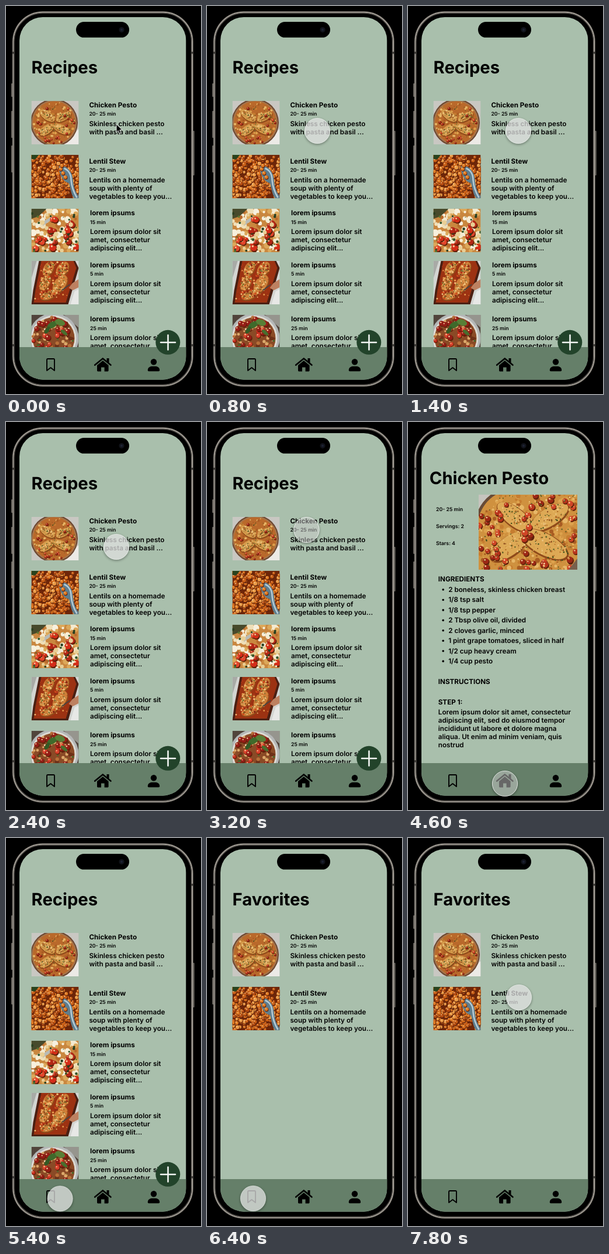
An HTML page that plays this animation: 334 by 662 pixels, repeating every 8000 ms.

```html
<!DOCTYPE html>
<html lang="en">
<head>
<meta charset="utf-8">
<title>Recipe app</title>
<style>
  html, body { margin: 0; width: 100%; height: 100%; overflow: hidden; background: #000; }
  svg { display: block; }
  text {
    font-family: Inter, Arial, sans-serif; white-space: pre;
    font-optical-sizing: none; text-rendering: geometricPrecision;
  }
</style>
</head>
<body>
<svg id="stage" width="100%" height="100%" viewBox="0 0 334 662"></svg>
<script>
const LOOP = 8000, STEP = 200;
const stage = document.getElementById('stage');

// Markup helpers
const text = (x, y, s, size = 11.68, weight = 600) =>
  `<text x="${x}" y="${y}" font-size="${size}" font-weight="${weight}">${s}</text>`;
const lines = (x, y, list, gap) => list.map((s, i) => text(x, y + i * gap, s)).join('');
const rect = (x, y, w, h, fill, r = 0, more = '') =>
  `<rect x="${x}" y="${y}" width="${w}" height="${h}" rx="${r}" fill="${fill}" ${more}/>`;
const circle = (x, y, r, fill, more = '') =>
  `<circle cx="${x}" cy="${y}" r="${r}" fill="${fill}" ${more}/>`;
const oval = (x, y, rx, ry, turn, fill) =>
  `<ellipse rx="${rx}" ry="${ry}" fill="${fill}" transform="translate(${x} ${y}) rotate(${turn})"/>`;
const path = (d, fill, more = '') => `<path d="${d}" fill="${fill}" ${more}/>`;

function random(seed) {
  return () => (seed = (seed * 16807) % 2147483647) / 2147483647;
}

const dot = (x, y, r, fill) => circle(x.toFixed(1), y.toFixed(1), r.toFixed(1), fill);
// A round bit with a dark underside and a highlight
const bead = (x, y, r, fill) => dot(x + r * .2, y + r * .3, r * 1.1, '#5e200a') +
  dot(x, y, r, fill) + dot(x - r * .3, y - r * .35, r * .28, '#f6cf9c');

// Scatter round bits over a w by h area
function scatter(seed, n, w, h, r0, r1, colors, inside = () => true, shape = dot) {
  const rnd = random(seed * 7919);
  let out = '';
  for (let i = 0; i < n; i++) {
    const x = rnd() * w, y = rnd() * h, r = r0 + rnd() * (r1 - r0);
    const fill = colors[Math.floor(rnd() * colors.length)];
    if (inside(x, y)) out += shape(x, y, r, fill);
  }
  return out;
}

// Food pictures, thumbnails are 81 by 74
const GOLD = ['#dda24d', '#e7b768', '#c67d30', '#a95c22'];
const RED = ['#b8331c', '#cf4526', '#9c2715'];
const GREEN = ['#3f4f1c', '#5f6428'];

const fillet = (x, y, rx, ry, turn, seed, tone = '#d59c4c') => {
  const spice = ['#edc683', '#b06a27', '#e2b061', '#8a4a1c', '#5f6428'];
  const bits = scatter(seed, 60, rx * 1.5, ry * 1.3, .5, 1.5, spice);
  return oval(x + .6, y + 1.4, rx, ry, turn, '#8f4a1a') + oval(x, y, rx * .95, ry * .9, turn, tone) +
    `<g transform="translate(${x} ${y}) rotate(${turn}) translate(${-rx * .75} ${-ry * .65})">${bits}</g>`;
};

function pesto() {
  const pan = (x, y) => Math.hypot(x - 39, y - 37) < 35;
  return rect(0, 0, 81, 74, '#c9c7c2') + path('M50 74L81 48V74Z', '#eceae6') +
    circle(39, 37, 40.5, '#6b4630') + circle(39, 37, 38.5, '#a5754c') + circle(39, 37, 36.5, '#b9692b') +
    scatter(3, 160, 81, 74, .8, 2.4, GOLD, pan) +
    fillet(27, 25, 16, 8, 35, 4) + fillet(55, 27, 15, 7, -28, 5) +
    fillet(26, 49, 15, 8, -35, 6) + fillet(52, 48, 17, 8, 25, 8) +
    scatter(9, 60, 81, 74, 1.5, 2.5, RED, (x, y) => pan(x, y) && Math.hypot(x - 39, y - 37) > 21, bead) +
    scatter(10, 60, 81, 74, .5, 1, GREEN, pan);
}

function stew() {
  const peas = ['#e07a22', '#c95f17', '#ea9a45', '#d36b1c', '#b34c12'];
  return rect(0, 0, 81, 74, '#6e2609') +
    scatter(21, 300, 81, 74, 2.2, 3.6, peas, undefined, bead) +
    path('M0 0H13L6 8L0 7Z', '#28431d') +
    path('M47 20C57 15 70 27 71 41C72 55 76 65 81 70V74H73C67 66 67 54 64 48C54 46 47 32 47 20Z', '#5f7d8c') +
    path('M56 23C64 26 68 34 68 43C69 55 73 65 78 73', 'none', 'stroke="#b5cbd6" stroke-width="2.6"') +
    [[50, 24], [54, 31], [58, 38], [52, 18]].map(([x, y]) => bead(x, y, 3, peas[0])).join('');
}

function bake() {
  const low = (x, y) => x + y * 1.3 > 55;
  return rect(0, 0, 81, 74, '#c9873f') +
    scatter(31, 90, 81, 74, 2, 6, ['#efdfb8', '#dca85a', '#f4ead0', '#b96a2c', '#f7f0de']) +
    path('M0 0H26L12 13L0 17Z', '#474a2b') + path('M17 24L35 13L37 17L20 29Z', '#b8bbb6') +
    scatter(34, 34, 81, 74, 3, 6, ['#d42d18', '#e2452a', '#b42716'], low, bead) +
    scatter(36, 24, 81, 74, 1.5, 4, ['#f7eed6', '#e9cf95']) +
    scatter(37, 30, 81, 74, .8, 2.4, ['#35562a', '#5c752f', '#293f20']);
}

function tray() {
  const tone = '#cf7f38';
  return rect(0, 0, 81, 74, '#d3d5d2') + path('M0 0H9L0 30Z', '#a8aaa6') +
    path('M13 0H75L81 12L63 74H0L3 50Z', '#4a1f12') + path('M17 0H72L77 12L59 71H4L7 50Z', '#9c3212') +
    fillet(29, 13, 14, 9, -60, 41, tone) + fillet(53, 14, 15, 10, -55, 42, tone) +
    fillet(23, 37, 15, 9, -60, 43, tone) + fillet(49, 39, 18, 11, -55, 44, tone) + fillet(29, 58, 15, 8, -20, 45, tone) +
    scatter(46, 150, 62, 66, .7, 2, ['#cf4a1c', '#8d2c15', '#efbd77', '#b5361a', '#e59a4c'], (x, y) => x > 17 - y / 6 && x < 76 - y / 4) +
    path('M81 31L70 38L64 46L71 50L81 45Z', '#bd8060') + path('M66 40L52 50', 'none', 'stroke="#444" stroke-width="1.6"') +
    path('M67 74L74 52L81 48V74Z', '#e7e8e6');
}

function salad() {
  const dish = (x, y) => Math.hypot(x - 38, y - 39) < 36;
  return rect(0, 0, 81, 74, '#51443b') + path('M56 0H81V22Z', '#96958e') +
    circle(38, 40, 43, '#b4b7b7') + circle(38, 40, 39, '#dddbd3') + circle(38, 40, 36, '#8a4a26') +
    scatter(51, 90, 81, 74, 1.5, 3.5, ['#dba86a', '#b77039', '#6d3018'], dish) +
    scatter(53, 26, 81, 74, .8, 2, ['#4a6b2c', '#f0d4b0'], dish) +
    scatter(52, 60, 81, 74, 3, 4.6, ['#c22a1c', '#941d16', '#d8402b'], dish, bead) +
    oval(36, 17, 10, 5, -28, '#3f6a2b') + oval(49, 13, 9, 5, 20, '#587f36') +
    oval(27, 26, 7, 3.5, -55, '#345924') + oval(56, 30, 7, 3, 40, '#486f2e');
}

function closeUp() {
  const food = (x, y) => x + y > 38;
  const edge = (x, y) => food(x, y) && (y < 22 || x < 38 || Math.abs(x - 86) < 9 || y > 108 || x > 158);
  return rect(0, 0, 169, 128, '#cf913f') + path('M0 0H26C12 8 5 18 0 30Z', '#c6c4be') +
    path('M28 -2C12 8 4 20 -2 36', 'none', 'stroke="#674b37" stroke-width="5"') +
    scatter(61, 320, 169, 128, 1.5, 4.5, GOLD, food) +
    fillet(62, 38, 38, 17, 38, 62, '#dda955') + fillet(121, 38, 39, 17, -32, 63, '#dda955') +
    fillet(52, 88, 39, 18, -35, 64, '#dda955') + fillet(112, 84, 46, 20, 28, 65, '#dda955') +
    scatter(66, 95, 169, 128, 3.5, 5.6, RED, edge, bead) +
    scatter(69, 170, 169, 128, .6, 1.8, ['#efc781', '#b56d29', '#e8b863'], food) +
    scatter(68, 130, 169, 128, .6, 1.4, GREEN, food) +
    path('M154 128L169 109V128Z', '#77604c');
}

const photo = (x, y, w, h, art) => `<svg x="${x}" y="${y}" width="${w}" height="${h}" overflow="hidden">${art}</svg>`;

// Pages
const filler = ['Lorem ipsum dolor sit', 'amet, consectetur', 'adipiscing elit...'];
const recipes = [
  [162, 142.4, 172.8, 'Chicken Pesto', '20- 25 min', ['Skinless chicken pesto', 'with pasta and basil ...'], pesto],
  [254, 142.4, 268.8, 'Lentil Stew', '20- 25 min', ['Lentils on a homemade', 'soup with plenty of', 'vegetables to keep you...'], stew],
  [346, 144, 357.2, 'lorem ipsums', '15 min', filler, bake],
  [435, 144, 445.8, 'lorem ipsums', '5 min', filler, tray],
  [527, 144, 538, 'lorem ipsums', '25 min', filler, salad]
];
const row = ([top, x, y, name, time, about, art]) =>
  photo(43.5, top, 81, 74, art()) + text(x, y, name, 11.68, 700) +
  text(x, y + 14.6, time, 8.75) + lines(x, y + 32, about, 14);

const listPage = (title, items) => text(43.6, 115.4, title, 29.2, 700) + items.map(row).join('');

const ingredients = ['2 boneless, skinless chicken breast', '1/8 tsp salt', '1/8 tsp pepper',
  '2 Tbsp olive oil, divided', '2 cloves garlic, minced', '1 pint grape tomatoes, sliced in half',
  '1/2 cup heavy cream', '1/4 cup pesto'];
const steps = ['Lorem ipsum dolor sit amet, consectetur', 'adipiscing elit, sed do eiusmod tempor',
  'incididunt ut labore et dolore magna', 'aliqua. Ut enim ad minim veniam, quis', 'nostrud'];

const detailPage = () =>
  text(36.8, 106, 'Chicken Pesto', 29.2, 700) +
  ['20- 25 min', 'Servings: 2', 'Stars: 4'].map((s, i) => text(48, 151.6 + i * 29, s, 8.75)).join('') +
  photo(121, 124, 169, 128, closeUp()) +
  text(51.8, 272.2, 'INGREDIENTS', 11.68, 700) + lines(69.2, 289.8, ingredients, 17.45) +
  ingredients.map((s, i) => circle(60.2, 286 + i * 17.45, 1.8, '#000')).join('') +
  text(51.8, 446.6, 'INSTRUCTIONS', 11.68, 700) + text(51.8, 481.6, 'STEP 1:', 11.68, 700) +
  lines(51.8, 499, steps, 14);

const navBar = () =>
  rect(23, 582, 285.5, 56, '#657f69') +
  path('M71.5 602H81.5Q83 602 83 603.5V622L76.5 617L70 622V603.5Q70 602 71.5 602Z', 'none',
    'stroke="#000" stroke-width="1.9" stroke-linejoin="round"') +
  path('M152.2 612.6L165.8 601.4L179.4 612.6', 'none',
    'stroke="#000" stroke-width="2.6" stroke-linecap="round" stroke-linejoin="round"') +
  path('M172.5 601H176.5V609L172.5 606Z', '#000') +
  path('M156 613L165.8 605L175.6 613V622Q175.6 623.4 174.2 623.4H168.6V616.5H163V623.4H157.4Q156 623.4 156 622Z', '#000') +
  circle(253, 607.3, 5.2, '#000') +
  path('M242.8 621.5C242.8 617 246.5 614.8 250 614.8H256C259.6 614.8 263.2 617 263.2 621.5Q263.2 623.2 261.5 623.2H244.5Q242.8 623.2 242.8 621.5Z', '#000');

const addButton = () => circle(277.3, 573.8, 21, '#22432a') +
  path('M265 574H290M277.5 561.5V586.5', 'none', 'stroke="#f2f5f2" stroke-width="2.6" stroke-linecap="round"');

const body = () => {
  const metal = '#716d66';
  return [[132, 23], [179, 46], [238, 46]].map(([y, h]) => rect(9, y, 4, h, metal, 1)).join('') +
    rect(319, 213, 3.6, 76, metal, 1) +
    rect(10.8, 9, 310, 640.4, '#64605a', 52) +
    rect(12.6, 10.8, 306.4, 636.8, '#000', 50.2, 'stroke="#a29d95" stroke-width="2"') +
    rect(14.2, 12.4, 303.2, 633.6, '#000', 48.6, 'stroke="#4a4743" stroke-width="1.2"') +
    [78, 577].map(y => rect(10.8, y, 3.6, 3.6, '#3b3935') + rect(317.2, y, 3.6, 3.6, '#3b3935')).join('') +
    rect(135, 12.2, 62, 1.4, '#35332f', .7);
};

const page = (id, content) => `<g id="${id}">${content}</g>`;

stage.innerHTML =
  `<defs><clipPath id="screen">${rect(23, 19, 285.5, 618.4, '#000', 40)}</clipPath>
   <filter id="soft" x="-50%" y="-50%" width="200%" height="200%"><feGaussianBlur stdDeviation="2.2"/></filter>
   <mask id="rim">${rect(-40, -40, 80, 80, '#fff') + circle(0, 0, 22, '#000')}</mask></defs>` +
  rect(0, 0, 334, 662, '#000') + body() +
  `<g clip-path="url(#screen)">${rect(23, 19, 285.5, 619, '#a9bfac')}` +
  page('home', listPage('Recipes', recipes)) +
  page('detail', detailPage()) +
  page('saved', listPage('Favorites', recipes.slice(0, 2))) +
  navBar() + page('add', addButton()) + '</g>' +
  rect(120, 27, 91, 26.8, '#000', 13.4) + circle(198, 40.6, 4.6, '#11131a') + circle(198, 40.6, 2, '#1d2233') +
  page('arrow', path('M189 201.5V215.5L192.2 212.6L194.4 217.6L197 216.5L194.8 211.6H199.2Z', '#000',
    'stroke="#fff" stroke-width=".9" stroke-linejoin="round"')) +
  page('touch', `<g mask="url(#rim)">${circle(0, 1.5, 22, '#000', 'opacity=".38" filter="url(#soft)"')}</g>` +
    circle(0, 0, 21.6, '#e0e0e0', 'id="disc" stroke="#fff" stroke-width="1"'));

const el = id => document.getElementById(id);
const show = (id, on) => el(id).setAttribute('display', on ? 'inline' : 'none');

// Touch point: time, x, y
const route = [
  [0, 189, 213], [2400, 189, 213], [3000, 170.5, 184], [3400, 170.5, 184],
  [4400, 166, 617], [4800, 166, 617], [5600, 79, 615], [6600, 79, 615],
  [7600, 190, 272], [8000, 190, 272]
];
const presses = [[3000, 3400], [4600, 4800], [5800, 6000]];

function touchAt(t) {
  const i = route.findIndex(k => k[0] > t);
  const [t0, x0, y0] = route[i - 1], [t1, x1, y1] = route[i];
  const u = (t - t0) / (t1 - t0), e = u * u * (3 - 2 * u);
  return [x0 + (x1 - x0) * e, y0 + (y1 - y0) * e];
}

function draw(t) {
  const detail = t >= 3400 && t < 4800, saved = t >= 6000, home = !detail && !saved;
  show('home', home);
  show('add', home);
  show('detail', detail);
  show('saved', saved);
  show('arrow', t < 600);
  show('touch', t >= 600);
  const [x, y] = touchAt(t);
  const pressed = presses.some(([a, b]) => t >= a && t < b);
  el('touch').setAttribute('transform', `translate(${x.toFixed(2)} ${y.toFixed(2)})`);
  const disc = el('disc');
  disc.setAttribute('fill', pressed ? '#cecece' : '#e0e0e0');
  disc.setAttribute('fill-opacity', pressed ? .5 : .75);
  disc.setAttribute('stroke-opacity', pressed ? .75 : .5);
}

const start = performance.now();
function tick() {
  const t = (performance.now() - start) % LOOP;
  draw(Math.floor(t / STEP) * STEP);
  requestAnimationFrame(tick);
}
tick();
</script>
</body>
</html>
```
